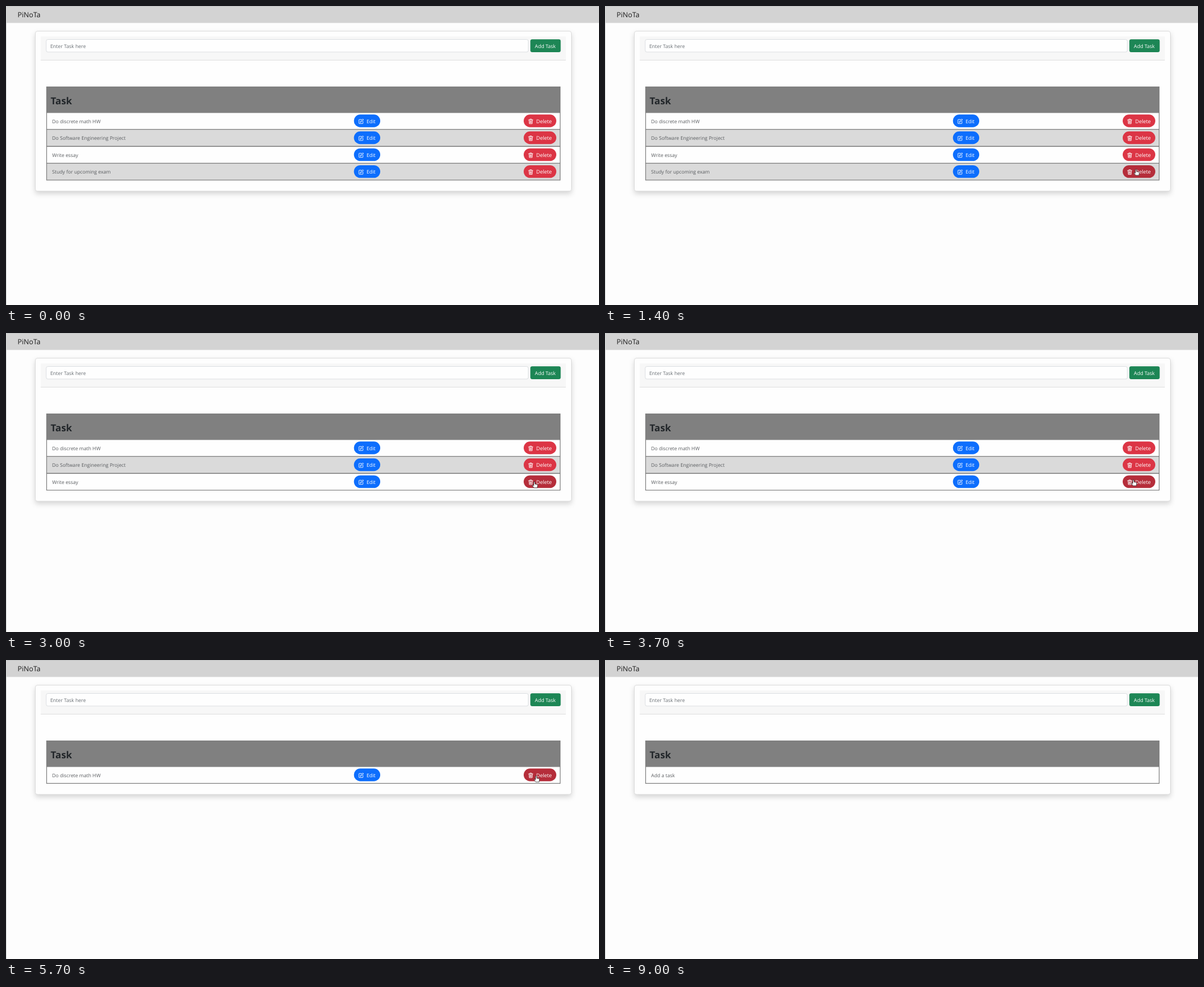
An HTML page that plays this animation: 1000 px wide and 505 px high, repeating every 9.7 s.

```html
<!DOCTYPE html>
<html lang="en">
<head>
<meta charset="utf-8">
<title>Task list</title>
<style>
  html, body { margin: 0; width: 100%; height: 100%; overflow: hidden; background: #fdfdfd; }
  svg { display: block; width: 1000px; height: 505px; }
  text {
    font: 8.5px "Open Sans", "Noto Sans", sans-serif;
    text-rendering: geometricPrecision;
    fill: #fff;
  }
  .brand { font-size: 11.95px; fill: #1c1c1c; }
  .hint { font-size: 8.4px; fill: #6a7075; }
  .head { font-size: 16.2px; font-weight: 700; fill: #212529; }
  .row text { font-size: 8.25px; fill: #5a5d60; }
  .row rect { fill: #fefefe; stroke: #808080; stroke-width: 1.2; }
  .row.odd rect { fill: #dadada; }
  .icon { fill: none; stroke: #fff; stroke-width: 1.5; stroke-linejoin: round; stroke-linecap: round; }
  .card {
    fill: #fefefe; stroke: #dcdcdc;
    filter: drop-shadow(0 4.5px 4.5px rgba(0, 0, 0, .16));
  }
  .del { color: #dc3545; }
  .pointer { fill: #fff; stroke: #222; stroke-width: .8; stroke-linejoin: round; }

  /* One loop is 9700 ms: 1% = 97 ms */
  .card, .row, .del, .cursor, .arrow, .hand, .first, .empty {
    animation: 9.7s step-end infinite;
  }
  .card { animation-name: shrink; }
  .row4 { animation-name: gone4; }
  .row3 { animation-name: gone3; }
  .row2 { animation-name: gone2; }
  .first { animation-name: gone1; }
  .empty { animation-name: shown; }
  .row4 .del { animation-name: hover4; }
  .row3 .del { animation-name: hover3; }
  .row2 .del { animation-name: hover2; }
  .first .del { animation-name: hover1; }
  .cursor { animation-name: travel; }
  .hand { animation-name: hand; }
  .arrow { animation-name: arrow; }

  @keyframes shrink {
    0% { height: 270.2px; }
    17.52% { height: 241.6px; }
    39.17% { height: 213px; }
    50.51%, 100% { height: 184.5px; }
  }
  @keyframes gone4 { 0% { opacity: 1; } 17.52%, 100% { opacity: 0; } }
  @keyframes gone3 { 0% { opacity: 1; } 39.17%, 100% { opacity: 0; } }
  @keyframes gone2 { 0% { opacity: 1; } 50.51%, 100% { opacity: 0; } }
  @keyframes gone1 { 0% { opacity: 1; } 61.85%, 100% { opacity: 0; } }
  @keyframes shown { 0% { opacity: 0; } 61.85%, 100% { opacity: 1; } }

  @keyframes hover4 { 12.37% { color: #b52d3a; } 17.52% { color: #dc3545; } }
  @keyframes hover3 { 23.71% { color: #b52d3a; } 39.17% { color: #dc3545; } }
  @keyframes hover2 { 46.39% { color: #b52d3a; } 50.51% { color: #dc3545; } }
  @keyframes hover1 { 57.73% { color: #b52d3a; } 61.85% { color: #dc3545; } }

  @keyframes hand {
    0%, 17.52%, 39.17%, 50.51%, 61.85%, 100% { opacity: 0; }
    12.37%, 23.71%, 46.39%, 57.73% { opacity: 1; }
  }
  @keyframes arrow {
    0%, 17.52%, 39.17%, 50.51%, 61.85%, 100% { opacity: 1; }
    12.37%, 23.71%, 46.39%, 57.73% { opacity: 0; }
  }
  @keyframes travel {
    0% { transform: translate(930px, 520px); }
    5.15% { transform: translate(930px, 335px); animation-timing-function: steps(3); }
    8.24% { transform: translate(912px, 308px); }
    9.27% { transform: translate(912px, 308px); animation-timing-function: steps(5); }
    14.43% { transform: translate(895.5px, 275.5px); }
    21.64% { transform: translate(895.5px, 275.5px); animation-timing-function: steps(3); }
    24.74% { transform: translate(888.5px, 253px); }
    26.8% { transform: translate(888.5px, 253px); animation-timing-function: steps(4); }
    30.92% { transform: translate(891px, 251px); }
    31.95% { transform: translate(891px, 251px); animation-timing-function: steps(3); }
    35.05% { transform: translate(891px, 249px); }
    38.14% { transform: translate(891px, 247.5px); }
    44.32% { transform: translate(891px, 247.5px); animation-timing-function: steps(3); }
    47.42% { transform: translate(894.5px, 224.5px); }
    55.67% { transform: translate(894.5px, 224.5px); animation-timing-function: steps(3); }
    58.76% { transform: translate(894px, 195.5px); }
    67.01% { transform: translate(894px, 195.5px); animation-timing-function: steps(4); }
    71.13% { transform: translate(900px, 311px); }
    72.16% { transform: translate(900px, 311px); animation-timing-function: steps(2); }
    74.22% { transform: translate(896px, 346px); }
    89.69% { transform: translate(896px, 346px); animation-timing-function: steps(3); }
    92.78%, 100% { transform: translate(880px, 520px); }
  }
</style>
</head>
<body>
<svg viewBox="0 0 1000 505">
  <defs>
    <g id="edit">
      <rect x="586.7" y="183.3" width="44.4" height="21.4" rx="10.7" fill="#0d6efd"/>
      <path class="icon" transform="translate(594.3 190.3) scale(.57)"
        d="M9 2.5H2.5a1 1 0 0 0-1 1v10a1 1 0 0 0 1 1h10a1 1 0 0 0 1-1V8M5.5 10.5l.8-2.8L13.2 1l2 2-6.9 6.7z"/>
      <text x="608" y="197.6">Edit</text>
    </g>
    <g id="delete">
      <rect x="873" y="183.3" width="55" height="21.4" rx="10.7" fill="currentColor"/>
      <path class="icon" transform="translate(880.3 190.3) scale(.57)"
        d="M1.5 3.5h13M5.5 3V1.2h5V3M3 4l.8 11h8.4L13 4M6 6.5l.2 6M8 6.5v6M10 6.5l-.2 6"/>
      <text x="894" y="197.6" style="font-size:8.75px">Delete</text>
    </g>
    <rect id="cell" x="68.5" y="180" width="866" height="28.4"/>
  </defs>

  <rect width="1000" height="505" fill="#fdfdfd"/>
  <rect width="1000" height="28.6" fill="#d3d3d3"/>
  <path d="M0 .5H1000" stroke="#c3c6c6"/>
  <path d="M.5 0V505" stroke="#d3d7d7"/>
  <text class="brand" x="19.5" y="19">PiNoTa</text>

  <rect class="card" x="49.5" y="42.5" width="904" rx="3.5"/>
  <rect x="58.5" y="51.5" width="885.5" height="40" fill="#f7f7f7"/>
  <path d="M58.5 91.5H944" stroke="#dfdfdf"/>
  <rect x="67.8" y="56.5" width="813" height="21.3" rx="3" fill="#fefefe" stroke="#dde0e3"/>
  <text class="hint" x="74.7" y="70.6">Enter Task here</text>
  <rect x="884.2" y="56.3" width="51.2" height="21.7" rx="3.2" fill="#1d8655"/>
  <text x="891.8" y="70.6">Add Task</text>

  <rect x="67.9" y="136" width="867.2" height="44" fill="#808080"/>
  <text class="head" x="75.3" y="165.6">Task</text>

  <g class="row odd row4" transform="translate(0 85.6)">
    <use href="#cell"/><rect x="68.5" y="180" width="866" height="28.4"/>
    <text x="77.8" y="197.6">Study for upcoming exam</text>
    <use href="#edit"/><use class="del" href="#delete"/>
  </g>
  <g class="row row3" transform="translate(0 57.1)">
    <rect x="68.5" y="180" width="866" height="28.4"/>
    <text x="77.8" y="197.6">Write essay</text>
    <use href="#edit"/><use class="del" href="#delete"/>
  </g>
  <g class="row odd row2" transform="translate(0 28.5)">
    <rect x="68.5" y="180" width="866" height="28.4"/>
    <text x="77.8" y="197.6">Do Software Engineering Project</text>
    <use href="#edit"/><use class="del" href="#delete"/>
  </g>
  <g class="row">
    <rect x="68.5" y="180" width="866" height="28.4"/>
    <g class="first">
      <text x="77.8" y="197.6">Do discrete math HW</text>
      <use href="#edit"/><use class="del" href="#delete"/>
    </g>
    <text class="empty" x="77.8" y="197.6">Add a task</text>
  </g>

  <g class="cursor">
    <path class="pointer arrow" d="M0 0V10.5L2.4 8.3L4 12L5.6 11.3L4 7.7H7.4Z"/>
    <path class="pointer hand"
      d="M-1 .8Q0-.6 1 .8V4L4.6 4.8Q5.8 5.2 5.6 6.6L4.9 10.6H-.4L-3.4 7Q-3.4 5.6-2 6L-1 6.8Z"/>
  </g>
</svg>
</body>
</html>
```
